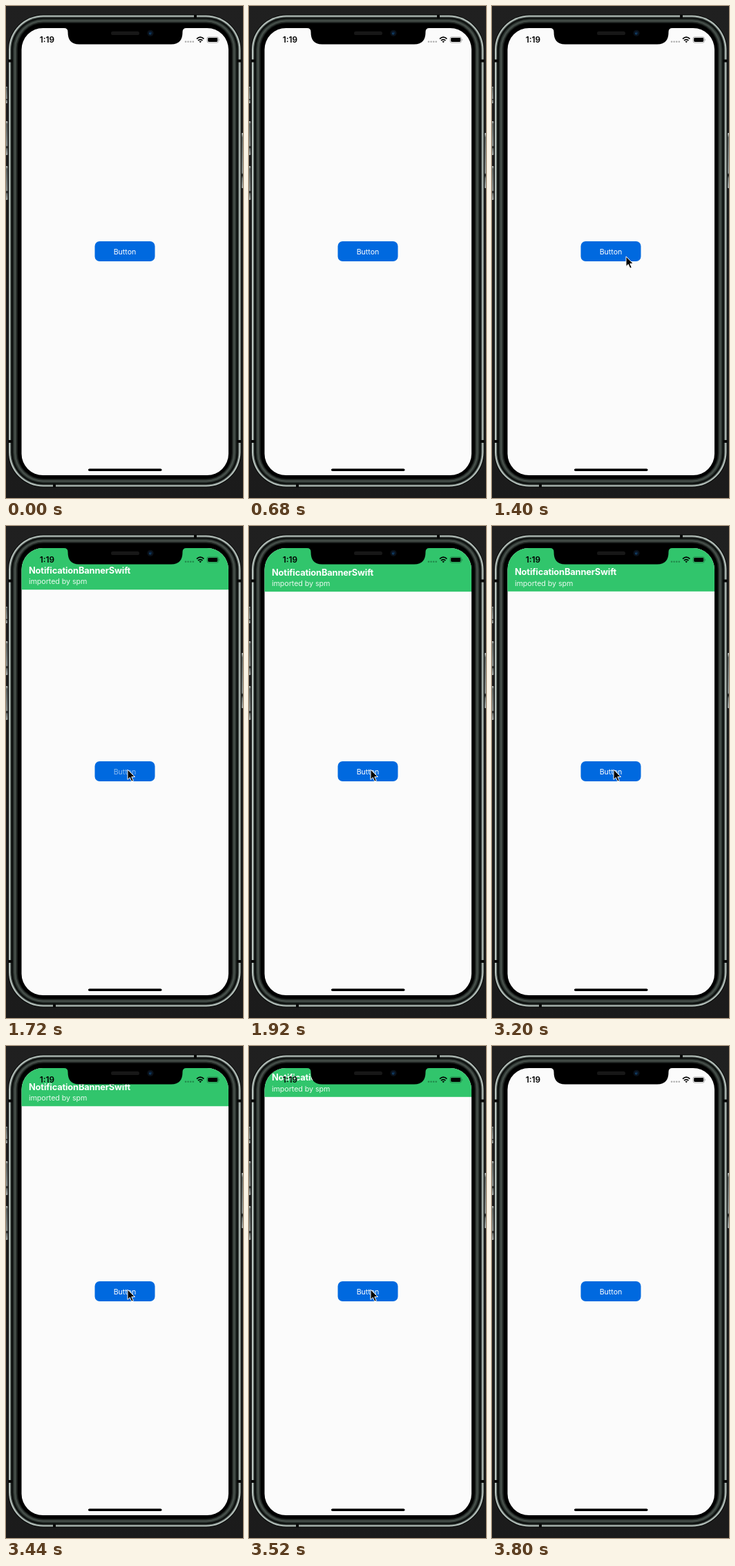
Animation, 343 px wide and 713 px high, one loop 4000 ms. Source, as an HTML page:

```html
<!DOCTYPE html>
<html lang="en">
<head>
<meta charset="utf-8">
<title>Banner demo</title>
<style>
  html, body { margin: 0; width: 100%; height: 100%; overflow: hidden; background: #1d1d1d; }
  svg { display: block; width: 343px; height: 713px; }
  text { font-family: Inter, "Liberation Sans", sans-serif; }
</style>
</head>
<body>
<svg viewBox="0 0 343 713">
  <defs>
    <linearGradient id="backdrop" x2="0" y2="1">
      <stop stop-color="#202020"/><stop offset="1" stop-color="#1b1b1b"/>
    </linearGradient>
    <linearGradient id="key" x2="0" y2="1">
      <stop stop-color="#c3c9c6"/><stop offset=".08" stop-color="#5b615e"/>
      <stop offset=".72" stop-color="#858b88"/><stop offset=".76" stop-color="#151716"/>
      <stop offset=".82" stop-color="#6b716e"/><stop offset="1" stop-color="#a4aaa7"/>
    </linearGradient>
    <clipPath id="screen"><rect x="22.5" y="32" width="299.5" height="648" rx="31"/></clipPath>
  </defs>

  <rect width="343" height="713" fill="url(#backdrop)"/>

  <!-- side keys -->
  <g fill="url(#key)">
    <rect x="-2" y="117" width="4" height="24" rx="1"/>
    <rect x="-2" y="167" width="4.5" height="49" rx="1"/>
    <rect x="-2" y="232" width="4.5" height="49" rx="1"/>
    <rect x="341" y="184" width="4" height="80" rx="1"/>
  </g>

  <g id="body"></g>

  <!-- antenna gaps -->
  <g fill="#080908">
    <rect x="3" y="77.5" width="6" height="4"/><rect x="335" y="77.5" width="6" height="4"/>
    <rect x="3" y="629" width="6" height="4"/><rect x="335" y="629" width="6" height="4"/>
    <rect x="272" y="13" width="4" height="5"/><rect x="68" y="692.5" width="4" height="5"/>
  </g>

  <g clip-path="url(#screen)">
    <rect x="22" y="31" width="301" height="650" fill="#fbfbfb"/>
    <rect x="128.5" y="341" width="87" height="29" rx="7" fill="#0069df"/>
    <text id="label" x="172" y="359.7" font-size="10.6" text-anchor="middle" fill="#fff">Button</text>

    <g id="banner">
      <rect x="22" y="-20" width="301" height="114.8" fill="#31c56c"/>
      <text x="33" y="71.2" font-size="12.8" font-weight="700" letter-spacing="-.13" fill="#fff">NotificationBannerSwift</text>
      <text x="33" y="86.8" font-size="10.7" letter-spacing="-.06" fill="#e9f9ef">imported by spm</text>
    </g>

    <!-- status bar -->
    <text x="48.8" y="53" font-size="11.8" font-weight="600">1:19</text>
    <g opacity=".3">
      <circle cx="260" cy="51.7" r="1.3"/><circle cx="263.6" cy="51.7" r="1.3"/>
      <circle cx="267.2" cy="51.7" r="1.3"/><circle cx="270.8" cy="51.7" r="1.3"/>
    </g>
    <g fill="none" stroke="#000" stroke-width="1.7">
      <path d="M276 47.6Q281.2 42.8 286.4 47.6"/><path d="M278 50Q281.2 47.1 284.4 50"/>
    </g>
    <path d="M279.5 51.4Q281.2 50 282.9 51.4L281.2 53.2Z"/>
    <rect x="291" y="44.8" width="16.4" height="8.4" rx="2.4" fill="none" stroke="#000" stroke-opacity=".38" stroke-width=".8"/>
    <rect x="292.2" y="46" width="14" height="6" rx="1.4"/>
    <path d="M308.5 47.6Q310 49 308.5 50.4Z" opacity=".45"/>

    <!-- notch and home indicator -->
    <path d="M84 31V32Q89.5 32 89.5 37.5C89.5 49 94 55.5 106 55.5H239C251 55.5 255.5 49 255.5 37.5Q255.5 32 261 32V31Z"/>
    <rect x="119" y="670.5" width="106.5" height="3.6" rx="1.8"/>
  </g>
  <rect x="152" y="36.8" width="41" height="5.2" rx="2.6" fill="#171717"/>
  <circle cx="209" cy="39.3" r="4.6" fill="#0a1119"/>
  <circle cx="209" cy="39.3" r="2.4" fill="#0b2440"/>
  <circle cx="208.4" cy="40.2" r="1" fill="#17517d"/>

  <path id="cursor" d="M0 0V14.4L3.3 11.4L5.8 17.2L8.3 16.1L5.8 10.5H10.4Z" fill="#000" stroke="#fff" stroke-width="1" stroke-linejoin="round"/>
</svg>

<script>
const LOOP = 4000, STEP = 40, TRAVEL = 63;
const el = id => document.getElementById(id);
const clamp = v => Math.min(1, Math.max(0, v));

// Nested phone shells: inset, colour, from the steel rim to the black bezel
const shells = [
  [3, "#070807"], [4, "#b4bfba"], [6, "#79837e"], [7, "#1c211f"], [8.5, "#080a09"],
  [10, "#2b332f"], [12, "#48514c"], [14, "#343b37"], [15.5, "#161a18"], [17, "#000"]
];
el("body").innerHTML = shells.map(([d, fill]) => {
  const top = 13.5 + (d - 4) * .88;
  return `<rect x="${d}" y="${top}" width="${343.5 - 2 * d}" height="${710 - 2 * top}" rx="${54 - d}" fill="${fill}"/>`;
}).join("");

// Cursor path: time, x, y
const path = [
  [1160, 204, 449], [1280, 201, 396], [1400, 194, 363],
  [1480, 187, 357], [1560, 179, 354], [1640, 176, 353]
];

function pointAt(t) {
  const i = path.findIndex(p => p[0] > t);
  if (i < 0) return path[path.length - 1].slice(1);
  const [a, b] = [path[i - 1], path[i]];
  const k = (t - a[0]) / (b[0] - a[0]);
  return [1, 2].map(n => a[n] + (b[n] - a[n]) * k);
}

// Damped spring settling on 1 with a small overshoot
function spring(s) {
  const w = 14.1 * s;
  return 1 - Math.exp(-13.8 * s) * (Math.cos(w) + .979 * Math.sin(w));
}

const easeInOut = k => k < .5 ? 2 * k * k : 1 - 2 * (1 - k) ** 2;

function draw(time) {
  const t = Math.floor(time % LOOP / STEP) * STEP;

  const hasCursor = t >= 1160 && t < 3800;
  el("cursor").style.display = hasCursor ? "" : "none";
  if (hasCursor) el("cursor").setAttribute("transform", `translate(${pointAt(t)})`);

  const shown = t >= 1720 && t < 3800;
  const place = spring((t - 1570) / 1000) - easeInOut(clamp((t - 3320) / 490));
  el("banner").style.display = shown ? "" : "none";
  if (shown) el("banner").setAttribute("transform", `translate(0 ${(place - 1) * TRAVEL})`);

  const pressed = t >= 1640 && t < 1920;
  el("label").setAttribute("opacity", pressed ? .55 + .45 * clamp((t - 1720) / 200) : 1);
}

const start = performance.now();
function tick() {
  draw(performance.now() - start);
  requestAnimationFrame(tick);
}
tick();
</script>
</body>
</html>
```
